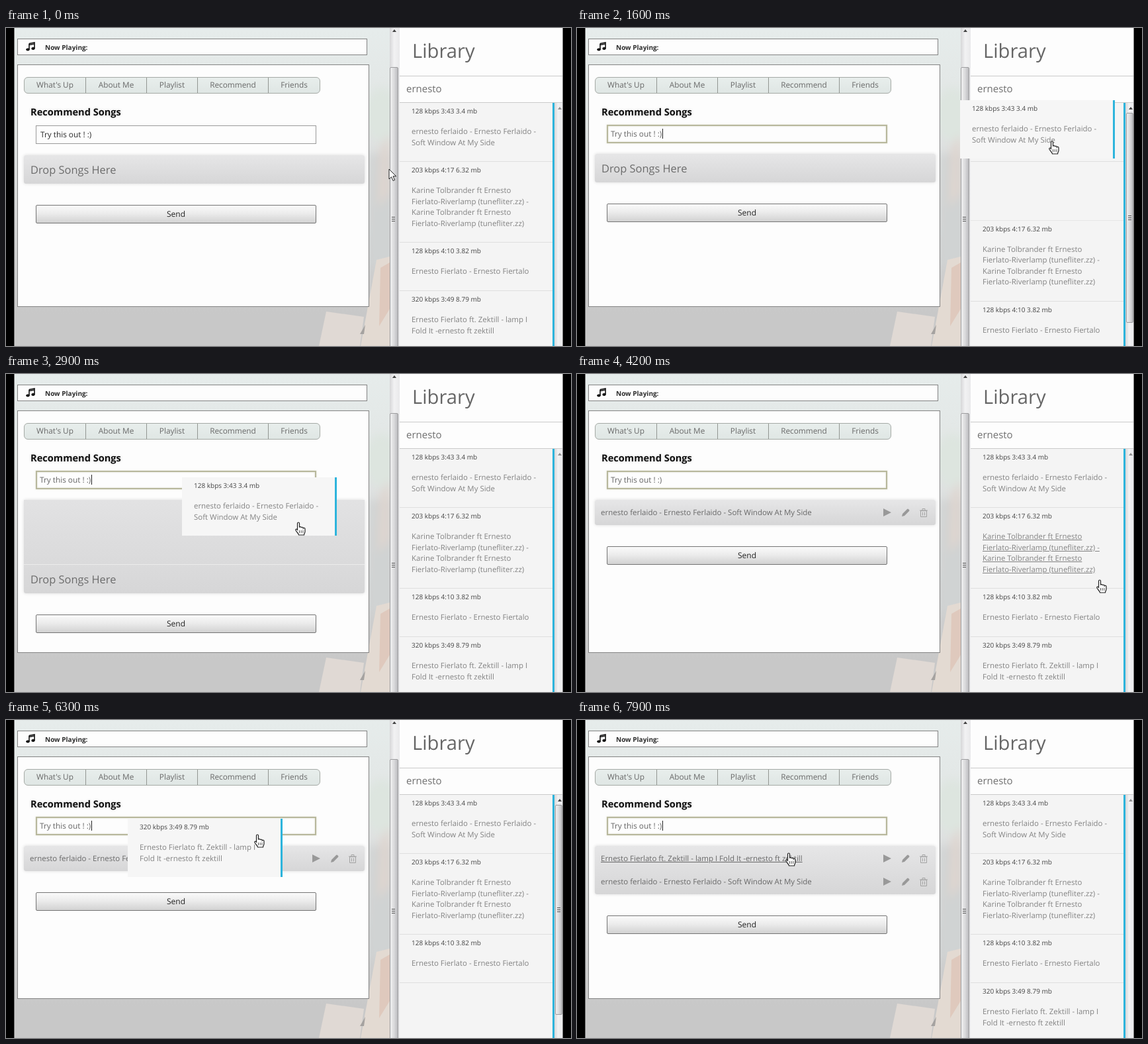
These frames come from a looping animation (854 by 480 pixels, 8 s). An HTML page:

```html
<!DOCTYPE html>
<html lang="en">
<head>
<meta charset="utf-8">
<title>Song library</title>
<style>
html, body { margin: 0; width: 100%; height: 100%; overflow: hidden; background: #000; }
#stage { position: relative; width: 854px; height: 480px; overflow: hidden; background: #000;
  font: 11.8px/20px "Open Sans", sans-serif; color: #686868; white-space: nowrap;
  text-rendering: geometricPrecision; }
#stage * { box-sizing: border-box; }
.a { position: absolute; }
svg { position: absolute; overflow: visible; }

.page { left: 12px; top: 0; width: 569px; height: 480px;
  background: linear-gradient(#e6eceb, #e2e6e5 25%, #d6d7d7 60%, #c8c8c8 90%); border-left: 1px solid #777; }
.panel { background: #fdfdfd; border: 1px solid #838383; }
.tabs { left: 27px; top: 74px; width: 448px; height: 25px; border: 1px solid #a5aaa5; border-radius: 6px;
  background: linear-gradient(#e8eeec, #dfe6e4); }
.tabs span { position: absolute; top: 0; height: 23px; line-height: 23px; text-align: center; }
.tabs span + span { border-left: 1px solid #929692; }
h1, h2 { margin: 0; font-weight: 400; }
.head { left: 37px; top: 117px; font-size: 14.6px; font-weight: 700; color: #101010; text-shadow: 0 0 4px #d8d8d8; }

#field { left: 45px; top: 147px; width: 424px; height: 28px; padding-left: 6px; line-height: 27px;
  background: #fdfdfd; border: 1px solid #9a9a9a; color: #2a2a2a; }
#field.focus { top: 146px; padding-left: 4px; line-height: 24px; border: 2px solid #b8b89c; color: #666;
  box-shadow: 0 0 3px #dedecf, inset 0 0 3px #dedecf; }
#caret { display: inline-block; width: 1px; height: 15px; margin-left: 1px; background: #222; vertical-align: -3px; }

#box { left: 27px; width: 515px; background: linear-gradient(#e6e6e7, #d6d6d7); border-radius: 3px;
  box-shadow: 0 0 5px #dcdcdc; }
#slot { height: 98px; background: linear-gradient(#e2e2e3, #dadadb); border-bottom: 1px solid #ececec; }
#hint { height: 43px; padding-left: 10px; line-height: 43px; font-size: 16.4px; color: #6c6c6c; }
.row { position: relative; height: 35px; top: 1.5px; padding-left: 9px; line-height: 35px; font-size: 11.5px; }
.row svg { left: 436px; top: 11px; fill: #999; }
.under { text-decoration: underline; }
#send { left: 45px; width: 424px; height: 28px; border: 1px solid #747474; border-radius: 2px; line-height: 26px;
  text-align: center; font-size: 12px; color: #222; background: linear-gradient(#fafafa, #ececec 45%, #d2d2d2); }

.bar { background: linear-gradient(90deg, #d6d6d8, #f2f2f3 45%, #e8e8ea); }
.thumb { border: 1px solid #9c9c9e; border-radius: 2px; background: linear-gradient(90deg, #f0f0f1, #d8d8da 55%, #bababd); }
.grip { width: 5px; height: 7px; background: repeating-linear-gradient(#555 0 1px, transparent 1px 3px); }
.up { width: 0; height: 0; border: 3px solid transparent; border-top: 0; border-bottom: 4px solid #444; }

.lib { left: 595px; top: 0; width: 247px; height: 480px; background: #fdfdfd; border-right: 1px solid #8a8a8a; }
.lib h1 { left: 19px; top: 14px; font-size: 29.2px; line-height: 40px; color: #666; }
.query { left: 0; top: 72px; width: 246px; height: 41px; border: solid #cacaca; border-width: 1px 0;
  padding-left: 10px; line-height: 38px; font-size: 15px; color: #707070; }
#list { left: 595px; top: 113px; width: 234px; height: 367px; overflow: hidden;
  background: #f4f4f4; border-right: 3px solid #2db4dc; }
.item { min-height: 73px; padding: 4px 0 19px 18px; border-bottom: 1px solid #dfdfdf; }
.item small { display: block; height: 32px; line-height: 16px; font-size: 10px; color: #444; }
.item div { line-height: 16.5px; font-size: 11.45px; color: #838383; }
.item.press { background: #fdfdfd; }
#gap { height: 88.5px; border-bottom: 1px solid #e6e6e6; }
#drag { left: 0; top: 0; width: 234px; height: 88px; background: #f6f6f6; border-right: 3px solid #2db4dc; }
#drag .item { border: 0; }
.cursor { left: 0; top: 0; fill: #fdfdfd; stroke: #222; }
</style>
</head>
<body>
<div id="stage">
  <div class="a page"></div>
  <svg width="854" height="480">
    <defs>
      <clipPath id="left"><rect x="13" width="567" height="480"/></clipPath>
      <filter id="soft"><feGaussianBlur stdDeviation="7"/></filter>
    </defs>
    <g clip-path="url(#left)">
      <g filter="url(#soft)">
        <ellipse cx="568" cy="130" rx="26" ry="40" fill="#dde5df"/>
        <path d="M548 190h40v170h-40z" fill="#d0d3d3"/>
        <path d="M566 180l14-20v90l-18 20z" fill="#dfd5cf"/>
      </g>
      <path d="M560 350l20-5v135h-44z" fill="#e3dad2"/>
      <path d="M566 362l14-8v70l-16 26z" fill="#dfc9bd"/>
      <path d="M484 428l57 8-6 44h-62z" fill="#e0d9d4"/>
      <path d="M535 462l8-14-2 14z" fill="#a5a2a0"/>
    </g>
  </svg>

  <div class="a panel" style="left:17px;top:16px;width:529px;height:25px"></div>
  <svg style="left:30px;top:21px" width="14" height="14">
    <path d="M5 2.500l8-1.500v9M5 2.500v9M5 4.500l8-1.500" fill="none" stroke="#111" stroke-width="1.600"/>
    <ellipse cx="3" cy="11.500" rx="2.700" ry="2"/><ellipse cx="11" cy="10" rx="2.700" ry="2"/>
  </svg>
  <b class="a" style="left:59px;top:19px;font-size:10px;color:#2b2b2b">Now Playing:</b>

  <div class="a panel" style="left:17px;top:55px;width:532px;height:366px"></div>
  <div class="a tabs">
    <span style="left:0;width:92px">What's Up</span>
    <span style="left:92px;width:92px">About Me</span>
    <span style="left:184px;width:77px">Playlist</span>
    <span style="left:261px;width:107px">Recommend</span>
    <span style="left:368px;width:78px">Friends</span>
  </div>
  <h2 class="a head">Recommend Songs</h2>
  <div class="a" id="field">Try this out ! :)<i id="caret"></i></div>
  <div class="a" id="box">
    <div id="slot"></div>
    <div id="hint">Drop Songs Here</div>
  </div>
  <div class="a" id="send">Send</div>

  <div class="a bar" style="left:580px;top:0;width:15px;height:480px"></div>
  <div class="a up" style="left:584px;top:2px"></div>
  <div class="a thumb" style="left:580px;top:59px;width:13px;height:424px"></div>
  <div class="a grip" style="left:583px;top:285px"></div>

  <div class="a lib">
    <h1 class="a">Library</h1>
    <div class="a query">ernesto</div>
    <div class="a bar" style="left:234px;top:113px;width:12px;height:367px"></div>
    <div class="a up" id="arrow" style="left:239px;top:119px"></div>
    <div id="scroll">
      <div class="a thumb" style="left:235px;top:128px;width:11px;height:317px"></div>
      <div class="a grip" style="left:238px;top:283px"></div>
    </div>
  </div>
  <div class="a" id="list"><div id="gap"></div></div>
  <div class="a" id="drag"></div>

  <svg class="cursor" id="arrowCur" width="12" height="19">
    <path d="M0 0v15l3.500-3.200 2.600 5.700 2.500-1.100-2.600-5.600h4.700z"/>
  </svg>
  <svg class="cursor" id="handCur" width="16" height="20">
    <path d="M-1.500 1.500c0-2 3-2 3 0v6c.5-1.500 3-1 3 .5.500-1.300 2.800-.8 2.800.8.600-1 2.700-.5 2.700 1v4c0 2-1.500 3-1.500 5.200h-8c-.3-2.500-3-4-4.500-7-.8-2 1.200-2.500 2.500-.8z" stroke-width="1.200"/>
    <path d="M1.500 12v4M4.200 12v4M6.900 12v4" stroke="#555"/>
  </svg>
</div>
<script>
const $ = id => document.getElementById(id);
const LOOP = 8000, STEP = 100;

const songs = [
  ['128 kbps 3:43 3.4 mb', 'ernesto ferlaido - Ernesto Ferlaido -', 'Soft Window At My Side'],
  ['203 kbps 4:17 6.32 mb', 'Karine Tolbrander ft Ernesto', 'Fierlato-Riverlamp (tunefliter.zz) -',
    'Karine Tolbrander ft Ernesto', 'Fierlato-Riverlamp (tunefliter.zz)'],
  ['128 kbps 4:10 3.82 mb', 'Ernesto Fierlato - Ernesto Fiertalo'],
  ['320 kbps 3:49 8.79 mb', 'Ernesto Fierlato ft. Zektill - lamp I', 'Fold It -ernesto ft zektill']
];
const tops = [113, 201, 322, 395, 483];

// [time, x, y]; each move starts fast and slows down
const cursorPath = [
  [0, 579, 213], [100, 579, 213], [900, 771, 181], [1400, 771, 181], [1500, 755, 177], [1600, 718, 171],
  [2600, 442, 224], [3300, 442, 224], [4200, 790, 311], [4700, 791, 418], [5400, 791, 420],
  [6200, 380, 173], [6500, 380, 173], [7000, 320, 201], [LOOP, 320, 201]
];
// grab: pointer place inside the dragged song
const drags = [
  { song: 0, press: 1300, start: 1500, drop: 3200, grab: [176, 68] },
  { song: 3, press: 4700, start: 5500, drop: 7300, grab: [196, 24] }
];

function pointer(t) {
  const i = Math.max(1, cursorPath.findIndex(k => k[0] >= t));
  const [t0, x0, y0] = cursorPath[i - 1], [t1, x1, y1] = cursorPath[i];
  const p = 1 - (1 - (t - t0) / (t1 - t0)) ** 2;
  return [x0 + (x1 - x0) * p, y0 + (y1 - y0) * p];
}

function makeItem([meta, ...lines]) {
  const el = document.createElement('div');
  el.className = 'item';
  el.innerHTML = `<small>${meta}</small><div>${lines.join('<br>')}</div>`;
  return el;
}

function makeRow([, ...lines]) {
  const el = document.createElement('div');
  el.className = 'row';
  el.innerHTML = `<span>${lines.join(' ')}</span><svg width="70" height="13">
    <path d="M0 0l12 6-12 6z"/>
    <path d="M28 12l1-4 7-7q1-1 2 0l1 1q1 1 0 2l-7 7z"/>
    <path d="M56.500 3.500h9v9h-9zM55 3h12M59 2.500v-2h4v2M59.500 5.500v5M62.500 5.500v5" fill="none" stroke="#a2a2a2"/></svg>`;
  return el;
}

const items = songs.map(makeItem);
$('list').append(...items);
const copies = drags.map(d => makeItem(songs[d.song]));
$('drag').append(...copies);
const rows = drags.map(d => makeRow(songs[d.song]));
$('box').append(rows[1], rows[0]);

const show = (el, on) => { el.style.display = on ? '' : 'none'; };
const place = (el, x, y) => { el.style.transform = `translate(${Math.round(x)}px, ${Math.round(y)}px)`; };

function draw(t) {
  const [x, y] = pointer(t);
  const held = drags.findIndex(d => t >= d.start && t < d.drop);
  const d = drags[held];
  const pressed = drags.find(g => t >= g.press && t < g.start);
  const count = drags.filter(g => t >= g.drop).length;
  const focused = t >= drags[0].press;
  const boxTop = focused ? 190 : 192;
  const inBox = !!d && x < 542 && y > boxTop, inList = !!d && !inBox;

  // left side
  $('field').classList.toggle('focus', focused);
  show($('caret'), focused && (t + 245) % 900 < 450);
  show($('slot'), inBox);
  show($('hint'), !count);
  rows.forEach((r, i) => show(r, i < count));
  const boxHeight = (count ? 35 * count + 3 : 43) + (inBox ? 98 : 0);
  $('box').style.top = boxTop + 'px';
  $('box').style.height = boxHeight + 'px';
  $('send').style.top = boxTop + boxHeight + 32 + 'px';
  const overRow = count === 2 && x < 350;
  rows[1].firstChild.classList.toggle('under', overRow);

  // library
  items.forEach((el, i) => {
    const over = !d && !pressed && x > 595 && y >= tops[i] && y < tops[i + 1];
    el.lastChild.classList.toggle('under', over);
    el.classList.toggle('press', !!pressed && pressed.song === i);
  });
  show($('gap'), inList);
  if (inList) $('list').insertBefore($('gap'), items[d.song || 1]);
  show($('scroll'), inList);
  $('arrow').style.opacity = inList ? 1 : 0.55;

  // the dragged song trails the pointer by one step
  show($('drag'), !!d);
  copies.forEach((el, i) => show(el, i === held));
  if (d) {
    const [px, py] = pointer(t - STEP);
    place($('drag'), px - d.grab[0], py - d.grab[1]);
  }
  const hand = !!d || overRow || x > 595;
  show($('handCur'), hand);
  show($('arrowCur'), !hand);
  place(hand ? $('handCur') : $('arrowCur'), x, y);
}

const begin = performance.now();
function tick() {
  const t = (performance.now() - begin) % LOOP;
  draw(Math.floor(t / STEP) * STEP);
  requestAnimationFrame(tick);
}
tick();
</script>
</body>
</html>
```
